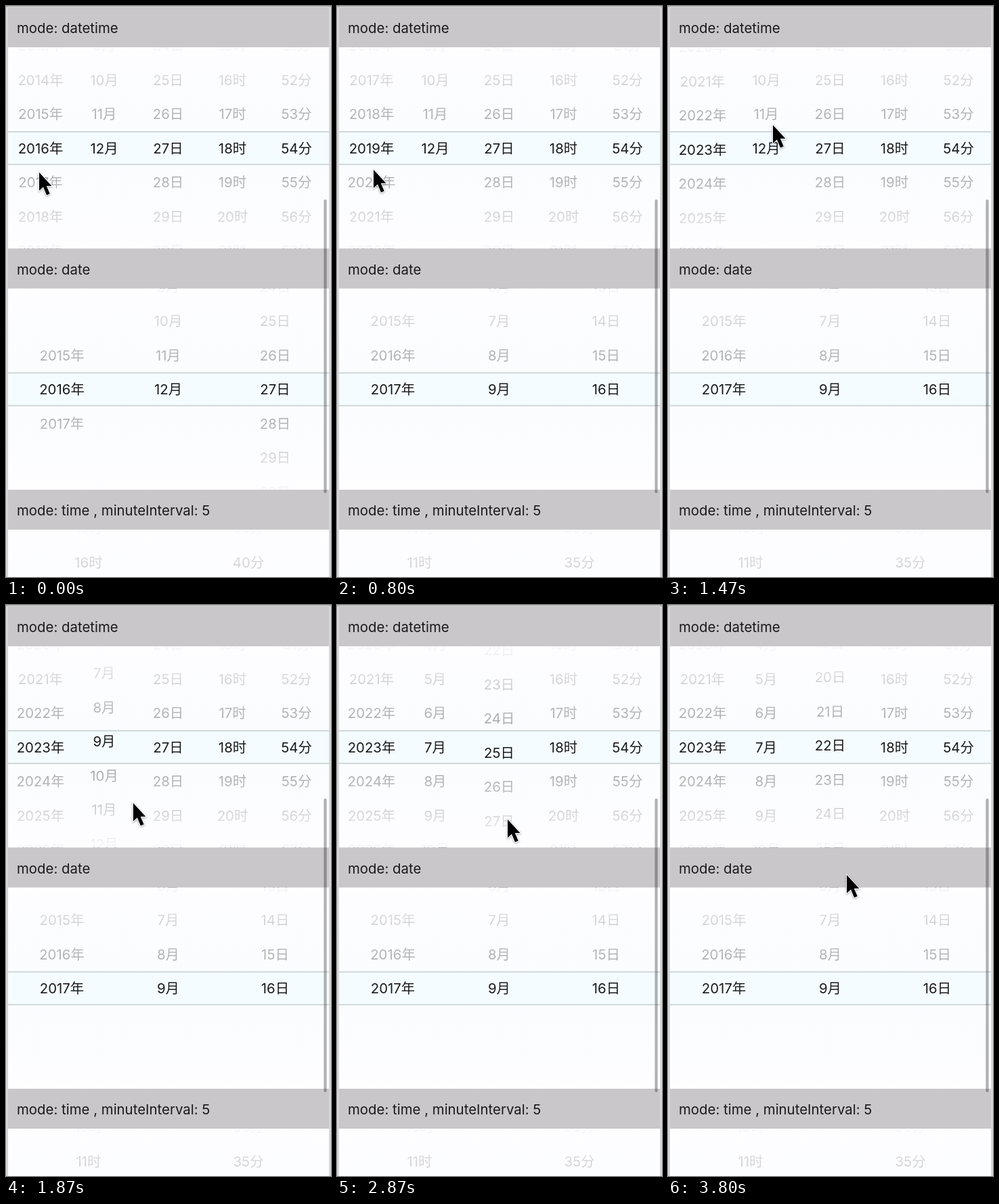
An HTML page for the animation above (3870 ms loop, 480x844 px).

```html
<!DOCTYPE html>
<html lang="zh-CN">
<head>
<meta charset="utf-8">
<title>Date picker modes</title>
<style>
  html, body { margin: 0; width: 100%; height: 100%; overflow: hidden; background: #f5fcff; }
  svg { display: block; width: 480px; height: 844px; }
  text {
    font: 20.4px Inter, "Noto Sans CJK SC", "Noto Sans CJK", sans-serif;
    fill: #1a1a1c;
    white-space: pre;
  }
  .wheel text { text-anchor: middle; }
  .line { fill: #cdd4d8; }
  .header { fill: #c9c7c9; }
  #cursor { filter: drop-shadow(0 1.5px 1.5px rgba(0, 0, 0, .35)); }
</style>
</head>
<body>
<svg viewBox="0 0 480 844">
  <defs>
    <linearGradient id="fadeTop" x2="0" y2="1">
      <stop offset="0" stop-color="#fefdff" stop-opacity=".97"/>
      <stop offset="1" stop-color="#fefdff" stop-opacity=".6"/>
    </linearGradient>
    <linearGradient id="fadeBottom" x2="0" y2="1">
      <stop offset="0" stop-color="#fefdff" stop-opacity=".6"/>
      <stop offset="1" stop-color="#fefdff" stop-opacity=".97"/>
    </linearGradient>
  </defs>
  <rect width="480" height="844" fill="#f5fcff"/>
  <g id="pickers"></g>
  <path d="M0 0H3V844H0zM477 0H480V844H477z" fill="#d6d5d7"/>
  <path d="M0 0H480V1.5H0z" fill="#b0aeb0"/>
  <rect x="469.4" y="286" width="4.2" height="434" rx="2" fill="#000" fill-opacity=".3"/>
  <path id="cursor" d="M0 0V27L6 21.5L11 33.5L15.8 31.5L10.8 20H18.5Z"
        stroke="#fff" stroke-width="2" paint-order="stroke"/>
</svg>
<script>
const ROW = 50.5, LOOP = 3870, TICK = 200 / 3;
const SYNC = 670; // the lower pickers jump to new values here

// A flicked wheel: quick start, long settling tail
const flick = (start, rows, tau) => t =>
  t < start ? 0 : rows * (1 - Math.exp(-(((t - start) / tau) ** 1.6)));
const wheelFrom = (first, ...flicks) => t => flicks.reduce((sum, move) => sum + move(t), first);
const jump = (before, after) => t => t < SYNC ? before : after;
const fixed = v => () => v;

// Places where the pointer turns or rests: [time, x, y]
const pointerStops = [
  [0, 49, 245], [210, 78, 104], [330, 65, 130], [800, 54, 241], [1070, 82, 84],
  [1470, 155, 175], [1670, 155, 175], [1930, 193, 310], [2270, 231, 248], [2450, 231, 208],
  [2730, 277, 325], [2870, 252, 316], [3400, 237, 222], [3800, 264, 398]
];

function pointerAt(t) {
  const next = pointerStops.findIndex(stop => stop[0] > t);
  if (next < 0) return pointerStops.at(-1).slice(1);
  const [t0, x0, y0] = pointerStops[next - 1];
  const [t1, x1, y1] = pointerStops[next];
  const u = (t - t0) / (t1 - t0);
  const eased = u * u * (3 - 2 * u);
  return [x0 + (x1 - x0) * eased, y0 + (y1 - y0) * eased];
}

function add(parent, tag, attrs, text) {
  const node = document.createElementNS("http://www.w3.org/2000/svg", tag);
  for (const name in attrs) node.setAttribute(name, attrs[name]);
  if (text) node.textContent = text;
  return parent.appendChild(node);
}

const root = document.getElementById("pickers");
const cursor = document.getElementById("cursor");
const wheels = [];

function addWheel(parent, x, center, { unit, min, max, step = 1, value, limit = fixed(max) }) {
  const node = add(parent, "g", { class: "wheel" });
  const rows = [];
  for (let v = min; v <= max; v += step)
    rows.push({ v, label: add(node, "text", { x, y: (v - min) / step * ROW }, v + unit) });
  wheels.push({ node, rows, value, limit, min, step, baseline: center + 7.3 });
}

function addPicker(top, title, xs, columns) {
  const view = add(root, "svg", {
    x: 0, y: top + 59, width: 480, height: 297.5, viewBox: `0 ${top + 59} 480 297.5`
  });
  columns.forEach((column, i) => addWheel(view, xs[i], top + 208.5, column));
  const rect = (y, height, attrs) =>
    add(view, "rect", { x: 3, y: top + y, width: 474, height, ...attrs });
  rect(59, 124.5, { fill: "url(#fadeTop)" });
  rect(232.5, 124, { fill: "url(#fadeBottom)" });
  rect(183, 1.8, { class: "line" });
  rect(231.3, 1.8, { class: "line" });
  add(root, "rect", { x: 3, y: top, width: 474, height: 59, class: "header" });
  add(root, "text", { x: 16, y: top + 38 }, title);
}

addPicker(2, "mode: datetime", [51, 145, 239.5, 334.5, 429], [
  { unit: "年", min: 2010, max: 2028, value: wheelFrom(2016, flick(70, 3, 157), flick(870, 4, 231)) },
  { unit: "月", min: 1, max: 12, value: wheelFrom(12, flick(1670, -5, 224)) },
  { unit: "日", min: 1, max: 31,
    value: wheelFrom(27, flick(2470, -2.16, 130), flick(2870, .16, 120), flick(3400, -3, 166)) },
  { unit: "时", min: 0, max: 23, value: fixed(18) },
  { unit: "分", min: 0, max: 59, value: fixed(54) }
]);
addPicker(358.5, "mode: date", [82.5, 239.5, 397.5], [
  { unit: "年", min: 2015, max: 2017, value: jump(2016, 2017) },
  { unit: "月", min: 1, max: 12, value: jump(12, 9), limit: jump(12, 9) },
  { unit: "日", min: 1, max: 31, value: jump(27, 16), limit: jump(31, 16) }
]);
addPicker(715, "mode: time , minuteInterval: 5", [122, 358], [
  { unit: "时", min: 0, max: 23, value: jump(18, 13) },
  { unit: "分", min: 0, max: 55, step: 5, value: jump(50, 45) }
]);

function render(now) {
  // The picture advances 15 times a second, on times rounded to 10 ms
  const tick = Math.floor((now % LOOP + 3.4) / TICK) % 58;
  const t = Math.round(tick * TICK / 10) * 10;
  for (const { node, rows, value, limit, min, step, baseline } of wheels) {
    const y = baseline - (value(t) - min) / step * ROW;
    node.setAttribute("transform", `translate(0 ${y.toFixed(2)})`);
    for (const { v, label } of rows) label.style.display = v > limit(t) ? "none" : "";
  }
  const [x, y] = pointerAt(t);
  cursor.setAttribute("transform", `translate(${x.toFixed(2)} ${(y + 1).toFixed(2)})`);
}

const start = performance.now();
function loop() {
  render(performance.now() - start);
  requestAnimationFrame(loop);
}
loop();
</script>
</body>
</html>
```
